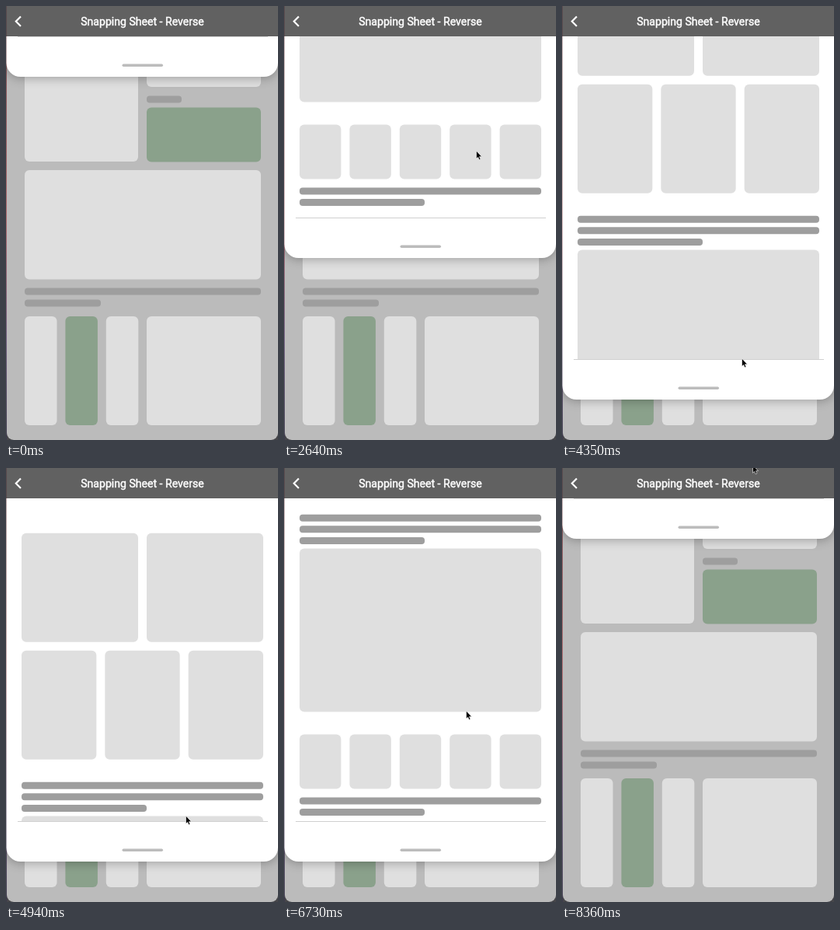
Animation, 350 px wide and 558 px high, one loop 8.61 s. Source, as an HTML page:

```html
<!DOCTYPE html>
<html lang="en">
<head>
<meta charset="utf-8">
<title>Snapping Sheet</title>
<style>
  html, body { margin: 0; width: 100%; height: 100%; overflow: hidden; background: #444; }
  svg { display: block; width: 100%; height: 100%; }
  .title { font: 400 14.1px Roboto, sans-serif; fill: #fff; stroke: #fff; stroke-width: .45; text-anchor: middle; }
  .paper { fill: #fff; filter: drop-shadow(0 1px 7px rgba(0, 0, 0, .32)); }
</style>
</head>
<body>
<svg viewBox="0 0 350 558">
  <defs>
    <linearGradient id="rim" x1="0" y1="0" x2="0" y2="1">
      <stop offset="0" stop-color="#7c5055"/>
      <stop offset=".45" stop-color="#a8656a"/>
      <stop offset=".75" stop-color="#6d5a7c"/>
      <stop offset="1" stop-color="#3d3a4c"/>
    </linearGradient>
    <clipPath id="aboveLine"><rect y="-700" width="350" height="700"/></clipPath>
  </defs>
  <rect width="350" height="558" fill="#46464a"/>
  <rect x="1" y="-20" width="349" height="578" rx="9" fill="#bbb"/>
  <g id="page"></g>
  <rect y="39" width="1" height="519" fill="url(#rim)"/>
  <g id="sheet">
    <rect class="paper" x=".5" y="-700" width="349.5" height="752" rx="18"/>
    <g clip-path="url(#aboveLine)"><g id="content"></g></g>
    <rect x="15" width="322" height="1" fill="#d0d0d0"/>
    <rect x="149.5" y="35.5" width="52.5" height="3.5" rx="1.75" fill="#bcbcbc"/>
  </g>
  <rect width="350" height="39" fill="#616161"/>
  <rect width="1" height="39" fill="#57494c"/>
  <path d="M19 13.5 12.8 19.8 19 26" fill="none" stroke="#fff" stroke-width="2.2"/>
  <text class="title" x="175.5" y="24.8">Snapping Sheet - Reverse</text>
  <g id="cursor">
    <path d="M-.5-.7V9.300L1.700 7.400 3.200 10.800 4.900 10 3.500 6.700H6.500Z" fill="#000" stroke="#fff" stroke-width=".6"/>
  </g>
</svg>
<script>
const LOOP = 8610, HEADER = 39, AREA = 519, FOOT = 52;
const TOP = HEADER + FOOT, MIDDLE = HEADER + AREA / 2 + FOOT / 2, BOTTOM = HEADER + AREA * .9;
const PALE = '#dfdfdf', GREEN = '#8aa18b', BAR = '#9e9e9e', GAP = 11;
const [page, sheet, content, cursor] = ['page', 'sheet', 'content', 'cursor'].map(id => document.getElementById(id));

function box(parent, x, y, width, height, fill = PALE) {
  const node = document.createElementNS('http://www.w3.org/2000/svg', 'rect');
  const rx = height < 10 ? 4 : 6;
  for (const [key, value] of Object.entries({ x, y, width, height, fill, rx })) node.setAttribute(key, value);
  parent.append(node);
}

box(page, 24, 60, 146, 140);
box(page, 181, 34, 147, 70);
box(page, 181, 115.5, 45, 9, BAR);
box(page, 181, 130.5, 147, 70, GREEN);
box(page, 24, 211, 304, 140.5);
box(page, 24, 362.5, 304, 9, BAR);
box(page, 24, 377.5, 98, 9, BAR);
[PALE, GREEN, PALE].forEach((fill, i) => box(page, 24 + i * 52.4, 399, 41.5, 140, fill));
box(page, 181, 399, 147, 140);

// Sheet content is stacked upwards from the divider
let edge = 0;
function stack(gap, height, columns, fill, full = 311) {
  edge -= gap + height;
  const width = (full - GAP * (columns - 1)) / columns;
  for (let i = 0; i < columns; i++) box(content, 20 + i * (width + GAP), edge, width, height, fill);
}
function paragraph(gap, lines) {
  for (let i = 0; i < lines; i++) stack(i ? 5.6 : gap, 9, 1, BAR, i ? 311 : 161);
}
paragraph(15, 2);
stack(GAP, 70, 5);
stack(29, 210, 1);
paragraph(5.5, 3);
stack(29, 140, 3);
stack(GAP, 140, 2);

// Each move: start, end, destination
const pointerMoves = [
  [230, 830, 258, 77], [970, 1266, 254, 130], [1870, 2720, 248, 188],
  [2760, 3261, 245, 248], [3680, 4350, 232, 454], [4860, 5790, 236, 171],
  [5990, 6350, 235, 380], [6350, 6830, 235, 305], [6860, 7400, 235, 111],
  [7730, 8030, 246, -3]
];
const scrollMoves = [[3680, 4850, 358], [4860, 5790, 75], [6350, 6830, 0]];

const smooth = u => u * u * (3 - 2 * u);
const progress = (start, end, t) => Math.min(1, Math.max(0, (t - start) / (end - start)));
const follow = (moves, from, t) => moves.reduce((at, [start, end, ...to]) =>
  at.map((value, i) => value + (to[i] - value) * smooth(progress(start, end, t))), from);
const pointerAt = t => follow(pointerMoves, [300, 212], t);

const elasticOut = u => 1 + 2 ** (-10 * u) * Math.sin((u - .1) * Math.PI * 5);
const expoOut = u => u >= 1 ? 1 : 1 - 2 ** (-10 * u);
function bounceOut(u) {
  let a = 0, b = 1;
  while (1 - u < (7 - 4 * a) / 11) { a += b; b /= 2; }
  return 1 - b * b + ((11 * u - 6 * a) / 4) ** 2;
}

// A drag follows the pointer until release, then the sheet snaps with its own curve
const drags = [
  { grab: 970, release: 1266, to: MIDDLE, ease: elasticOut, duration: 1750 },
  { grab: 2760, release: 3261, to: BOTTOM, ease: bounceOut, duration: 1000 },
  { grab: 6860, release: 7300, to: TOP, ease: expoOut, duration: 600 }
];
function sheetBottom(t) {
  let rest = TOP, bottom = TOP;
  for (const { grab, release, to, ease, duration } of drags) {
    if (t < grab) break;
    const held = rest + pointerAt(Math.min(t, release))[1] - pointerAt(grab)[1];
    bottom = t < release ? held : held + (to - held) * ease(progress(release, release + duration, t));
    rest = to;
  }
  return bottom;
}

const move = (node, x, y) => node.setAttribute('transform', `translate(${Math.round(x)} ${Math.round(y)})`);
function draw(t) {
  move(sheet, 0, sheetBottom(t) - FOOT);
  move(content, 0, follow(scrollMoves, [0], t)[0]);
  move(cursor, ...pointerAt(t));
  cursor.style.display = t < 70 ? 'none' : '';
}

const began = performance.now();
function tick() {
  draw((performance.now() - began) % LOOP);
  requestAnimationFrame(tick);
}
tick();
</script>
</body>
</html>
```
